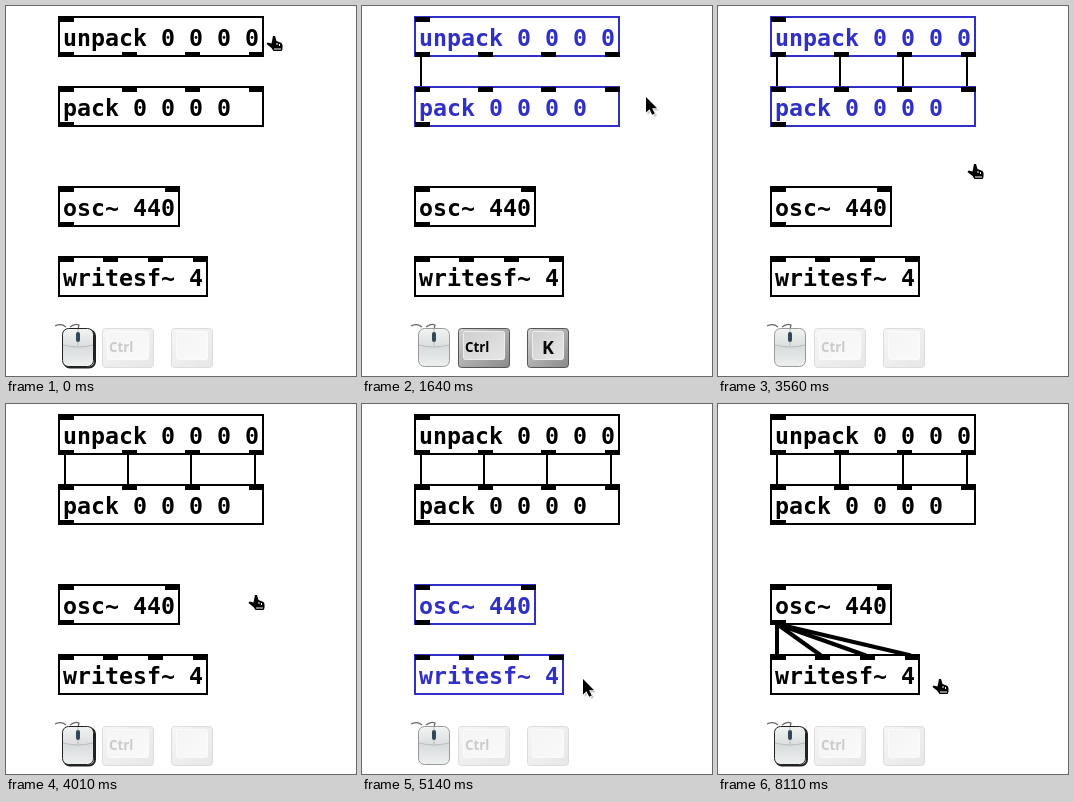
Animation, 350 px wide and 370 px high, one loop 9810 ms. Source, as an HTML page:

```html
<!DOCTYPE html>
<html lang="en">
<head>
<meta charset="utf-8">
<title>Patching objects</title>
<style>
  html, body { margin: 0; width: 100%; height: 100%; overflow: hidden; background: #fff; }
  svg { display: block; }
  .box { fill: #000; }
  .box .frame { fill: none; stroke: #000; stroke-width: 2; }
  .box text { font: bold 23.25px "DejaVu Sans Mono", monospace; white-space: pre; }
  .box.selected text { fill: #3030c8; }
  .box.selected .frame { stroke: #3030c8; }
  .cord { stroke: #000; stroke-width: 2; }
  .signal { stroke-width: 4; }
  .key { opacity: .2; }
  .key.on { opacity: 1; }
  .key text { font: bold 13.3px "Open Sans", sans-serif; }
  #keyK text { font-size: 18px; visibility: hidden; }
  #keyK.on text { visibility: visible; }
  .shade, .edge { fill: none; stroke: #222; }
  #mouse:not(.on) .shade { visibility: hidden; }
  #mouse:not(.on) .edge { stroke: #999; }
</style>
</head>
<body>
<svg id="stage" width="350" height="370" viewBox="0 0 350 370">
  <defs>
    <linearGradient id="side" x2="1" y2="1">
      <stop stop-color="#d4d4d4"/><stop offset="1" stop-color="#898989"/>
    </linearGradient>
    <linearGradient id="face" x2="1" y2="1">
      <stop stop-color="#cfcfcf"/><stop offset="1" stop-color="#e6e6e6"/>
    </linearGradient>
    <linearGradient id="shell" x2="0" y2="1">
      <stop stop-color="#f2f4f4"/><stop offset=".5" stop-color="#d9dddd"/><stop offset="1" stop-color="#eef0f0"/>
    </linearGradient>
  </defs>

  <g id="cords" shape-rendering="auto"></g>
  <g id="boxes"></g>

  <g id="mouse">
    <path d="M49 320q6-3 11 1M64 321q5-4 9-2l-1 4" fill="none" stroke="#666" stroke-width="1.2"/>
    <rect class="shade" x="58" y="324" width="31" height="37.500" rx="6" stroke-width="2"/>
    <rect class="edge" x="56.500" y="322.500" width="31" height="38" rx="6" style="fill:url(#shell)"/>
    <path d="M57 339q15 4 30 0M72 323v17" fill="none" stroke="#b8bcbc"/>
    <rect x="70" y="326" width="4" height="10" rx="2" fill="#34465a"/>
  </g>

  <g class="key" id="keyCtrl">
    <rect x="96.500" y="322.500" width="51" height="39" rx="3" fill="url(#side)" stroke="#555"/>
    <rect x="101.500" y="325.500" width="41" height="28" rx="2" fill="url(#face)" stroke="#eee"/>
    <text x="103" y="346">Ctrl</text>
  </g>
  <g class="key" id="keyK">
    <rect x="165.500" y="322.500" width="41" height="39" rx="3" fill="url(#side)" stroke="#555"/>
    <rect x="170.500" y="325.500" width="31" height="28" rx="2" fill="url(#face)" stroke="#eee"/>
    <text x="180" y="348">K</text>
  </g>

  <rect id="marquee" fill="none" stroke="#000" shape-rendering="crispEdges"/>

  <g id="hand">
    <path d="M0 0h2l1.500 5 5 2 1 2v4l-1 2h-8l-2-3-5-4 1-1.500 4 1z" stroke="#fff" stroke-width="1.500" paint-order="stroke"/>
    <path d="M1 13h7M4 7v2M6.500 8v2" stroke="#fff"/>
  </g>
  <g id="arrow">
    <path d="M1.500 2v16l4-3.500 3 5.500 2.500-1.500-2.500-5h4.500z" fill="#000" opacity=".2"/>
    <path d="M0 0v15.500l3.500-3.200 2.700 5.500 2.600-1.300-2.700-5.300h5z" stroke="#fff" stroke-width="1.500" paint-order="stroke"/>
  </g>
</svg>
<script>
const LOOP = 9810;
const byId = id => document.getElementById(id);

function add(parent, tag, attrs, text = "") {
  const el = document.createElementNS("http://www.w3.org/2000/svg", tag);
  for (const name in attrs) el.setAttribute(name, attrs[name]);
  el.textContent = text;
  parent.append(el);
  return el;
}

function makeBox(label, y, width, inlets, outlets) {
  const box = add(byId("boxes"), "g", { class: "box" });
  add(box, "rect", { class: "frame", x: 53, y: y + 1, width: width - 2, height: 39, "shape-rendering": "crispEdges" });
  const ports = (xs, top) => xs.forEach(x => add(box, "rect", { x, y: top, width: 15, height: 5 }));
  ports(inlets, y + 1);
  ports(outlets, y + 36);
  add(box, "text", { x: 57, y: y + 30 }, label);
  return box;
}

const four = [53, 116, 179, 243];
const upper = [
  makeBox("unpack 0 0 0 0", 10, 206, [53], four),
  makeBox("pack 0 0 0 0", 80, 206, four, [53])
];
const lower = [
  makeBox("osc~ 440", 180, 122, [53, 159], [53]),
  makeBox("writesf~ 4", 250, 150, [53, 97, 142, 187], [])
];

const makeCord = (start, x1, y1, x2, y2, kind = "") =>
  ({ start, el: add(byId("cords"), "line", { class: "cord " + kind, x1, y1, x2, y2 }) });
const cords = [
  ...[[1640, 59], [2040, 122], [2450, 185], [2850, 249]].map(([t, x]) => makeCord(t, x, 50, x, 81)),
  ...[[5580, 59], [5940, 103], [6340, 148], [6770, 193]].map(([t, x]) => makeCord(t, 59, 220, x, 251.5, "signal"))
];

// Pointer hot spot: time, x, y
const path = [
  [0, 267, 30], [390, 267, 30], [790, 239, 102], [930, 239, 102], [1240, 296, 97],
  [1380, 284, 91], [3000, 284, 91], [3080, 267, 107], [3920, 249, 191], [4010, 249, 191],
  [4570, 160, 282], [4630, 160, 282], [4960, 222, 276], [5050, 222, 276],
  [5180, 221, 275], [LOOP, 221, 275]
];

function pointerAt(t) {
  const i = path.findIndex(p => p[0] > t);
  const [t0, x0, y0] = path[i - 1], [t1, x1, y1] = path[i];
  const k = (t - t0) / (t1 - t0), e = k * k * (3 - 2 * k);
  return [Math.round(x0 + (x1 - x0) * e), Math.round(y0 + (y1 - y0) * e)];
}

const during = (t, ...spans) => spans.some(([a, b]) => t >= a && t < b);
const show = (el, on) => { el.style.visibility = on ? "visible" : "hidden"; };
const mark = (el, name, on) => el.classList.toggle(name, on);

function drawMarquee(t, x, y) {
  const el = byId("marquee");
  const first = during(t, [390, 930]);
  const [ax, ay] = first ? [267, 30] : [249, 191];
  show(el, (first || during(t, [4011, 4630])) && (x !== ax || y !== ay));
  el.setAttribute("x", Math.min(x, ax) + .5);
  el.setAttribute("y", Math.min(y, ay) + .5);
  el.setAttribute("width", Math.abs(x - ax));
  el.setAttribute("height", Math.abs(y - ay));
}

function render(now) {
  const t = now % LOOP;
  const [x, y] = pointerAt(t);
  const arrow = during(t, [1340, 3000], [5140, 6980]);
  for (const [id, on] of [["arrow", arrow], ["hand", !arrow]]) {
    show(byId(id), on);
    byId(id).setAttribute("transform", `translate(${x} ${y})`);
  }
  drawMarquee(t, x, y);
  upper.forEach(box => mark(box, "selected", during(t, [930, 3960])));
  lower.forEach(box => mark(box, "selected", during(t, [4630, 8110])));
  cords.forEach(cord => show(cord.el, t >= cord.start));
  mark(byId("mouse"), "on", during(t, [0, 930], [3960, 4630], [8110, LOOP]));
  mark(byId("keyCtrl"), "on", during(t, [1380, 3480], [5180, 7460]));
  mark(byId("keyK"), "on", during(t, [1600, 3370], [5540, 7350]));
}

const start = performance.now();
function tick() {
  render(performance.now() - start);
  requestAnimationFrame(tick);
}
tick();
</script>
</body>
</html>
```
